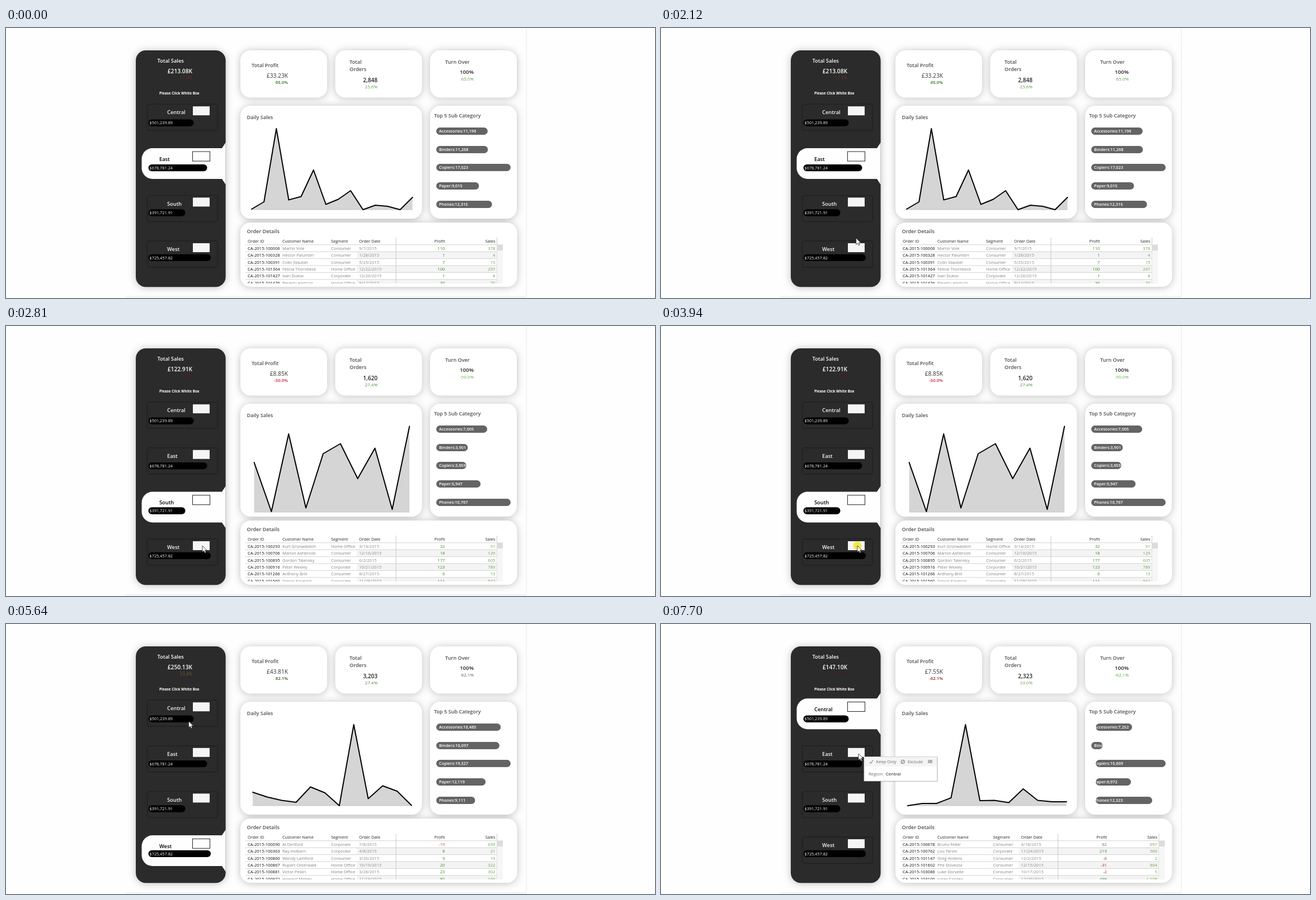
An HTML page that plays this animation: 1160 px wide and 483 px high, repeating every 8 s.

```html
<!DOCTYPE html>
<html lang="en">
<head>
<meta charset="utf-8">
<title>Sales dashboard</title>
<style>
html, body { margin: 0; width: 100%; height: 100%; overflow: hidden; background: #fefefe; }
svg { display: block; }
#stage { width: 100vw; height: 100vh; font-family: "Open Sans", "Noto Sans", sans-serif; }
.cards { filter: drop-shadow(0 1px 7px rgba(0, 0, 0, .25)); }
</style>
</head>
<body>
<svg id="stage" viewBox="0 0 1160 483">
  <g id="scene"></g>
  <g id="tip"></g>
  <circle id="click" r="7.5" fill="#f2e52e" opacity=".85"/>
  <path id="arrow" d="M0 0V11.5L2.7 9.1 4.5 13 6.4 12.1 4.7 8.4H8.3Z" fill="#fff" stroke="#222" stroke-width=".8"/>
  <g id="ring" fill="none" stroke-width="2.8">
    <circle r="5" fill="#f2f8fd" stroke="#2389dd"/>
    <path d="M0-5A5 5 0 0 1 5 0" stroke="#4ba6ea"/>
  </g>
</svg>
<script>
const LOOP = 8000;
const CENTRAL = 0, EAST = 1, SOUTH = 2, WEST = 3;
const NAMES = ['Central', 'East', 'South', 'West'];
const TOTALS = ['$501,239.89', '$678,781.24', '$391,721.91', '$725,457.82'];
const PILL_ENDS = [335.5, 359.5, 320.5, 366];
const CATEGORIES = ['Accessories', 'Binders', 'Copiers', 'Paper', 'Phones'];

// kpi: [value, change, change colour]; rows: id|name|segment|date|profit|sales
const DATA = [
  {
    sales: ['£147.10K', '-9.7%', '#4a1a1a'], profit: ['£7.55K', '-62.1%', '#9c2020'],
    orders: ['2,323', '33.0%', '#5fa746'], turn: ['-62.1%', '#58a53c'],
    bars: ['7,252', '', '15,609', '6,972', '12,323'],
    spans: [[777, 842], [769, 789.5], [777, 902], [777, 840], [777, 878]],
    x: 441, step: 25.8, base: 325,
    line: [325, 321, 321, 311, 180, 316, 315.5, 319.5, 295, 315.5, 318, 318],
    shift: 12.5, loss: '#96363a',
    rows: ['100678|Bruno Feller|Consumer|4/18|62|697', '100762|Lou Tarvin|Corporate|11/24|219|509',
      '101147|Greg Hollens|Consumer|12/2|-6|2', '101602|Phil Stovezza|Consumer|12/15|-31|804',
      '103086|Luke Dorvelle|Consumer|10/17|-2|5', '103100|Julian Corden|Consumer|12/20|499|1,108']
  }, {
    sales: ['£213.08K', '17.9%', '#64302d'], profit: ['£33.23K', '65.0%', '#2f6b20'],
    orders: ['2,848', '25.6%', '#5a9a44'], turn: ['65.0%', '#5f9c49'],
    bars: ['11,196', '11,268', '17,023', '9,015', '12,315'],
    x: 439, step: 22.12, base: 325,
    line: [324, 311, 180, 307.5, 301.5, 254, 315.5, 306.5, 291, 325, 317, 319, 325, 303],
    shift: 0, loss: '#b5622c',
    rows: ['100006|Martin Vole|Consumer|9/7|110|378', '100328|Hector Palumbri|Consumer|1/28|1|4',
      '100391|Colin Staubel|Consumer|5/25|7|15', '101364|Felicia Thornbeck|Home Office|12/22|100|297',
      '101427|Ivan Dukov|Corporate|12/26|1|8', '101476|Beverly Hartson|Home Office|9/12|30|70']
  }, {
    sales: ['£122.91K', '-3.9%', '#571d1f'], profit: ['£8.85K', '-50.0%', '#c9222a'],
    orders: ['1,620', '27.4%', '#4f8f3f'], turn: ['-50.0%', '#55b038'],
    bars: ['7,005', '3,901', '3,659', '5,947', '10,767'],
    x: 443.5, step: 30.85, base: 333,
    line: [244, 332, 193, 325.5, 228.5, 210.5, 273, 218.5, 328, 179.5],
    shift: 0, loss: '#b5622c',
    rows: ['100293|Kurt Grünwäldich|Home Office|3/14|32|91', '100706|Marion Ashbrook|Consumer|12/16|18|129',
      '100895|Gordon Talensky|Consumer|6/2|177|605', '100916|Peter Wexley|Corporate|10/21|123|789',
      '101266|Anthony Brill|Consumer|8/27|6|13', '101560|Simon Koverick|Corporate|11/28|111|542']
  }, {
    sales: ['£250.13K', '33.4%', '#6b5430'], profit: ['£43.81K', '82.1%', '#38541f'],
    orders: ['3,203', '27.4%', '#4f8f3f'], turn: ['82.1%', '#5b5f58'],
    bars: ['16,485', '16,097', '19,327', '12,119', '9,111'],
    x: 441, step: 25.8, base: 325,
    line: [301, 309.5, 315.5, 319, 291.5, 302, 325, 180, 312.5, 289.5, 299, 324.5],
    shift: 0, loss: '#b5622c',
    rows: ['100090|Al Denford|Corporate|7/8|-19|699', '100363|Ray Holbern|Corporate|4/8|8|21',
      '100860|Wendy Lamford|Consumer|3/26|9|19', '100867|Rupert Osterwald|Home Office|10/19|20|322',
      '100881|Victor Peslin|Home Office|3/28|23|302', '100972|Howard Milden|Home Office|11/19|80|166']
  }
];

// Pointer path: time, x, y
const PATH = [
  [190, 1128, 470], [330, 960, 448], [480, 640, 405], [620, 370, 356], [740, 244, 322],
  [860, 290, 292], [950, 333, 307], [1080, 336, 319], [1220, 341, 314], [1700, 341, 314],
  [2190, 350, 386], [2260, 351, 393], [4800, 351, 393], [5500, 336, 241], [5570, 331, 205],
  [5640, 326.5, 174], [5880, 332, 156], [6130, 339, 147], [6670, 339, 147],
  [7150, 352.5, 227], [7430, 352.5, 227], [7500, 353, 232], [LOOP, 353, 232]
];

const $ = id => document.getElementById(id);
const rect = (x, y, w, h, fill, rx = 0, more = '') =>
  `<rect x="${x}" y="${y}" width="${w}" height="${h}" rx="${rx}" fill="${fill}" ${more}/>`;
const text = (x, y, str, size, fill, weight = 400, anchor = 'start') =>
  `<text x="${x}" y="${y}" font-size="${size}" fill="${fill}" font-weight="${weight}" text-anchor="${anchor}">${str}</text>`;
const right = (x, y, str, size, fill, weight) => text(x, y, str, size, fill, weight, 'end');
const title = (x, y, str) => text(x, y, str, 9.1, '#4e4e50', 600);
const hline = (x1, x2, y) => `<path d="M${x1} ${y}H${x2}" stroke="#cfcfcf" stroke-width=".9"/>`;
const vline = (x, y1, y2) => `<path d="M${x} ${y1}V${y2}" stroke="#c4c4c4" stroke-width=".9"/>`;

function page() {
  const cards = [[419, 40, 155, 84.5], [588.5, 40, 155, 84.5], [758, 40, 155, 84.5],
    [419, 139, 324.5, 202], [758, 139, 155, 202], [419, 348, 494.5, 115]];
  return rect(929, 0, 2, 483, '#f3f3f3') + rect(213, 479, 718, 4, '#f5f5f5') +
    `<g class="cards">${rect(232, 40, 160.6, 423.3, '#2b2b2b', 18)}` +
    cards.map(c => rect(...c, '#fff', 18)).join('') + '</g>';
}

function tab(top) {
  const bottom = top + 55, r = 19.5;
  return `<path d="M262 ${top}H386L392.6 ${top - 10}V${bottom + 10}L386 ${bottom}H262` +
    `A${r} ${r} 0 0 1 242.5 ${bottom - r}V${top + r}A${r} ${r} 0 0 1 262 ${top}Z" fill="#fefefe"/>`;
}

function region(i, side, late) {
  const y = 136.3 + i * 81.6, boxY = y + 3.9;
  const settled = side === late || late === CENTRAL;
  const pillY = 163.5 + i * 80.4;
  let out = '';
  if (i === side) {
    out += tab(y - 3) + text(274, y + 19.7, NAMES[i], 9.3, '#000', 600);
    out += settled
      ? rect(333.5, boxY - .7, 31, 17, '#fff', 0, 'stroke="#222"')
      : rect(334, boxY, 30, 16, '#f5f5f5');
  } else {
    out += rect(252.5, y, 126, 47, '#2b2b2b', 4, 'stroke="#212121" stroke-width="1.6"') +
      text(288, y + 18, NAMES[i], 9.3, '#f6f6f6', 600) +
      rect(334, boxY, 30, 16, !settled && i === late ? '#fff' : '#f5f5f5');
  }
  return out + rect(254.5, pillY, PILL_ENDS[i] - 254.5, 12.4, '#000', 6.2) +
    text(256.5, pillY + 8.9, TOTALS[i], 7.35, '#f8f8f8');
}

function sidebar(side, late) {
  return text(270.5, 62.3, 'Total Sales', 9.3, '#fff', 600) +
    right(333, 81, DATA[side].sales[0], 10.2, '#fff', 600) +
    right(333, 92.3, DATA[late].sales[1], 8.1, DATA[late].sales[2]) +
    text(274, 118.7, 'Please Click White Box', 6.4, '#fff', 700) +
    NAMES.map((_, i) => region(i, side, late)).join('');
}

function kpis({ profit, orders, turn }) {
  return title(439, 69.6, 'Total Profit') +
    right(504, 88.6, profit[0], 10.2, '#333') +
    right(504, 99.8, profit[1], 7.8, profit[2], 600) +
    title(614, 64.2, 'Total') + title(614, 77, 'Orders') +
    right(664, 96.6, orders[0], 10.1, '#222', 600) + right(664, 107.8, orders[1], 8, orders[2]) +
    title(785, 63.5, 'Turn Over') +
    right(836, 82.4, '100%', 9.7, '#222', 600) + right(836, 93.8, turn[0], 8, turn[1]);
}

function chart({ x, step, base, line }) {
  const d = 'M' + line.map((y, i) => `${x + i * step} ${y}`).join('L');
  const end = x + (line.length - 1) * step;
  return title(430.5, 163.3, 'Daily Sales') +
    `<path d="${d}V${base}H${x}Z" fill="#d5d5d5"/><path d="M${x} ${base}H${end}" stroke="#bbb" stroke-width=".7"/>` +
    `<path d="${d}" fill="none" stroke="#000" stroke-width="2" stroke-linejoin="round" stroke-linecap="round"/>`;
}

function bars({ bars, spans }) {
  const nums = bars.map(b => +b.replace(',', ''));
  const max = Math.max(...nums);
  return title(765, 160, 'Top 5 Sub Category') + CATEGORIES.map((name, i) => {
    const [a, b] = spans ? spans[i] : [769, 782 + 120 * nums[i] / max];
    return `<svg x="${a}" y="${Math.round(178 + i * 32.65)}" width="${b - a}" height="13" overflow="hidden">` +
      rect(0, 0, b - a, 13, '#646464', 6.5) +
      text(774 - a, 9.2, `${name}:${bars[i]}`, 7.4, '#fff', 600) + '</svg>';
  }).join('');
}

function table(values, list) {
  const s = list.shift, size = 7.4, edge = 877.5 + s;
  let out = title(430.5, 366.7, 'Order Details');
  [[432, 'Order ID'], [494, 'Customer Name'], [581 + s, 'Segment'], [631 + s, 'Order Date']]
    .forEach(([x, str]) => out += text(x, 384.2, str, 7.3, '#222'));
  out += right(784.5 + s, 384.2, 'Profit', 7.4, '#222') + right(874.5 + s, 384.2, 'Sales', 7.4, '#222');
  out += '<svg width="1160" height="457" overflow="hidden">';
  list.rows.forEach((row, i) => {
    const [id, name, segment, date] = row.split('|');
    const [profit, sales] = values.rows[i].split('|').slice(4);
    const top = 387.8 + i * 12.4, y = top + 8.9;
    if (i % 2) out += rect(627 + s, top, 250, 12.4, '#f4f4f4');
    out += hline(428, edge, top) +
      text(432, y, 'CA-2015-' + id, 7.55, '#111') +
      text(494, y, name, size, '#808080') +
      text(581 + s, y, segment, size, '#808080') +
      text(631 + s, y, date + '/2015', 7.6, '#8a8a8a') +
      right(784.5 + s, y, profit, 7.7, profit[0] === '-' ? values.loss : '#3f8c2c') +
      right(874.5 + s, y, sales, 7.7, '#66a845');
  });
  return out + vline(697 + s, 375, 457) + vline(edge, 375, 457) +
    rect(edge, 387, 10.5, 70, '#f6f6f6') + rect(edge, 387.5, 10.5, 10.5, '#dcdcdc') + '</svg>';
}

function tooltip(x, y, name) {
  return `<g transform="translate(${x} ${y})">` +
    rect(1, 1, 131, 44, '#000', 0, 'opacity=".15"') +
    rect(0, 0, 130.5, 43.5, '#fff', 0, 'stroke="#c6c6c6" stroke-width=".8"') +
    rect(.5, .5, 129.5, 16.5, '#f4f4f4') +
    '<g fill="none" stroke="#666"><path d="M10 9.5l2 2.3 4-5.8"/><circle cx="69.3" cy="9" r="3.2"/>' +
    '<path d="M67 11.3l4.6-4.6"/><path d="M115 5.5v6m2-6v6m2-6v6m2-6v6" stroke-width=".9"/></g>' +
    text(21.5, 11.8, 'Keep Only', 7.6, '#6c6c6c') + text(78, 11.8, 'Exclude', 7.6, '#6c6c6c') +
    text(8, 33.6, 'Region:', 7.8, '#6c6c6c') + text(38.7, 33.6, name, 8, '#1c1c1c') + '</g>';
}

function pointer(t) {
  const k = PATH.findIndex(p => p[0] > t);
  if (k < 1) return null;
  const [t0, x0, y0] = PATH[k - 1], [t1, x1, y1] = PATH[k];
  const u = (t - t0) / (t1 - t0);
  return [x0 + (x1 - x0) * u, y0 + (y1 - y0) * u];
}

const at = (t, start, changes) => changes.reduce((v, [when, next]) => t >= when ? next : v, start);
const show = (id, on) => $(id).setAttribute('visibility', on ? 'visible' : 'hidden');
const move = (id, [x, y], turn = 0) => $(id).setAttribute('transform', `translate(${x} ${y}) rotate(${turn})`);

let drawn = '';
function frame() {
  const t = performance.now() % LOOP;
  // Totals refresh first, the chart and order list follow
  const side = at(t, EAST, [[2260, SOUTH], [4740, WEST], [7500, CENTRAL]]);
  const late = at(t, EAST, [[2740, SOUTH], [5150, WEST], [7430, CENTRAL]]);
  const tip = at(t, '', [[1420, 'South'], [1900, ''], [7700, 'Central']]);
  const key = [side, late, tip].join();
  if (key !== drawn) {
    drawn = key;
    const now = DATA[side], list = DATA[late];
    $('scene').innerHTML = page() + sidebar(side, late) + kpis(now) + chart(list) + bars(now) + table(now, list);
    $('tip').innerHTML = !tip ? '' : tip === 'South' ? tooltip(351.5, 319, tip) : tooltip(363, 237.5, tip);
  }
  const pos = pointer(t);
  const busy = t >= 7150 && t < 7500;
  show('arrow', pos && !busy);
  show('ring', busy);
  show('click', (t >= 3940 && t < 4010) || (t >= 6270 && t < 6400));
  if (pos) {
    move('arrow', pos);
    move('click', pos);
    move('ring', pos, t * .36);
  }
  requestAnimationFrame(frame);
}
frame();
</script>
</body>
</html>
```
